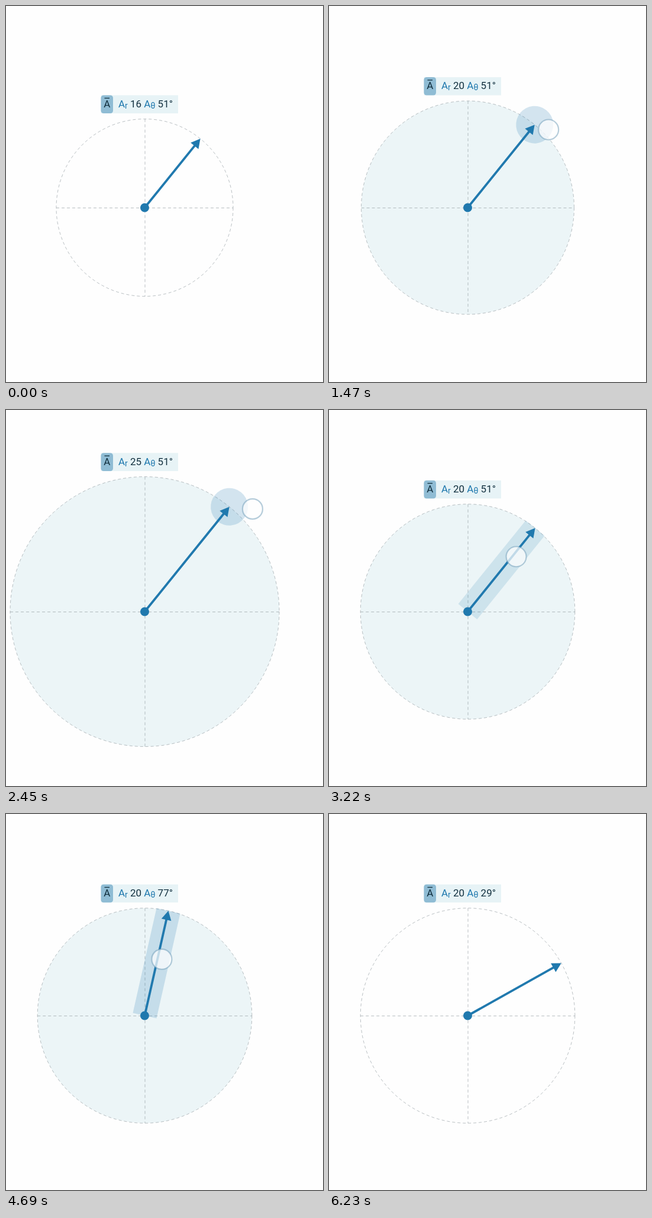
Recreate the animation shown at these times as an HTML page. Size 536 by 634 pixels, loop 6300 ms.

```html
<!DOCTYPE html>
<html lang="en">
<head>
<meta charset="utf-8">
<title>Polar vector</title>
<style>
  html, body { margin: 0; width: 100%; height: 100%; overflow: hidden; background: #fefefe; }
  svg { display: block; width: 536px; height: 634px; }
  text { font: 17px Roboto, sans-serif; fill: #12303f; text-anchor: middle; white-space: pre; }
  .var { fill: #2079ae; }
  .sub { fill: #2079ae; font-size: 14px; }
  .guide { fill: none; stroke: #8a9499; stroke-opacity: .6; stroke-dasharray: 5 4; }
  .glow { fill: #1f78b0; fill-opacity: .19; }
  .ink { fill: #2079ae; }
</style>
</head>
<body>
<svg viewBox="0 0 536 634">
  <rect id="edge" x="535" y="317" width="1" height="166" fill="#dcdcdc"/>
  <g transform="translate(234.5 340)">
    <circle id="disc" fill="#ecf5f7"/>
    <circle id="ring" class="guide"/>
    <path id="axes" class="guide"/>
    <g id="vector">
      <rect id="band" class="glow" x="0" y="-20.5" height="41"/>
      <circle id="halo" class="glow" r="31.5"/>
      <path id="shaft" fill="none" stroke="#2079ae" stroke-width="3.8"/>
      <path id="head" class="ink" d="M0 0L-15.5 -8.5V8.5Z"/>
    </g>
    <circle class="ink" r="7.5"/>
  </g>
  <g id="label">
    <rect x="160.5" width="130.5" height="30.5" fill="#e7f3f6"/>
    <rect x="160.5" width="20.5" height="30.5" rx="4.5" fill="#8fbcd4"/>
    <text x="170.8" y="20">A</text>
    <path d="M166.5 4.9h8.5" stroke="#12303f" stroke-width="1.3"/>
    <text x="236" y="20"><tspan class="var">A</tspan><tspan class="sub" dy="2">r</tspan><tspan id="radius" dy="-2"></tspan><tspan class="var">A</tspan><tspan class="sub" dy="2">θ</tspan><tspan id="angle" dy="-2"></tspan></text>
  </g>
  <circle id="cursor" r="17" fill="#fff" fill-opacity=".72" stroke="#6f9bb8" stroke-opacity=".5" stroke-width="2.2"/>
</svg>
<script>
const LOOP = 6300, STEP = 70, UNIT = 9.12, CX = 234.5, CY = 340;
const el = {};
document.querySelectorAll('[id]').forEach(n => el[n.id] = n);
const set = (name, attrs) => {
  for (const k in attrs) el[name].setAttribute(k, attrs[k]);
};

// Smooth monotone curve through [time, value] points
function track(keys) {
  const n = keys.length - 1;
  const slope = i => (keys[i + 1][1] - keys[i][1]) / (keys[i + 1][0] - keys[i][0]);
  const tangent = i => {
    if (i === 0 || i === n) return 0;
    const a = slope(i - 1), b = slope(i);
    return a * b <= 0 ? 0 : 2 * a * b / (a + b);
  };
  return t => {
    if (t <= keys[0][0]) return keys[0][1];
    if (t >= keys[n][0]) return keys[n][1];
    let i = 0;
    while (t > keys[i + 1][0]) i++;
    const [t0, v0] = keys[i], [t1, v1] = keys[i + 1];
    const h = t1 - t0, u = (t - t0) / h, w = 1 - u;
    return v0 * w * w * (1 + 2 * u) + v1 * u * u * (3 - 2 * u)
      + h * u * w * (tangent(i) * w - tangent(i + 1) * u);
  };
}
const fade = (in0, in1, out0, out1) => track([[in0, 0], [in1, 1], [out0, 1], [out1, 0]]);

const length = track([[980, 149.5], [1400, 169.5], [1820, 274.5], [1940, 284.5],
  [2100, 262], [2450, 227.5], [2800, 182.5], [2900, 181.3]]);
const theta = track([[3480, 51], [4060, 103.5], [4220, 111], [4900, 66],
  [5320, 63.7], [5740, 29.2]]);
// Pointer position relative to the arrow tip, in polar terms
const reach = track([[200, -60], [650, 8.5], [1400, 9.5], [1820, 12.3], [2450, 24],
  [2800, 28], [3400, -81], [4060, -80.5], [5320, -83.3]]);
const drift = track([[200, -25], [650, -7], [2450, -7.5], [2800, -11], [3400, 0],
  [4060, 0.5], [4900, -5], [5320, -5], [5740, -2]]);

const discFade = fade(140, 420, 5670, 6160);
const haloFade = fade(400, 600, 2900, 3080);
const bandFade = fade(3080, 3280, 5700, 5900);
const cursorFade = fade(140, 350, 5780, 6060);

function draw(t) {
  const r = length(t), a = theta(t);
  const d = r + reach(t), p = (a + drift(t)) * Math.PI / 180;
  set('disc', { r, opacity: discFade(t) });
  set('ring', { r });
  set('axes', { d: `M${-r} .5H${r}M.5 ${-r}V${r}` });
  set('vector', { transform: `rotate(${-a})` });
  set('band', { width: r, opacity: bandFade(t) });
  set('halo', { cx: r, opacity: haloFade(t) });
  set('shaft', { d: `M0 0H${r - 12}` });
  set('head', { transform: `translate(${r} 0)` });
  set('label', { transform: `translate(0 ${CY - r - 40})` });
  set('cursor', { cx: CX + d * Math.cos(p), cy: CY - d * Math.sin(p), opacity: cursorFade(t) });
  set('edge', { opacity: r > 264 ? 1 : 0 });
  el.radius.textContent = ` ${Math.round(r / UNIT)} `;
  el.angle.textContent = ` ${Math.round(a)}°`;
}

const start = performance.now();
function tick() {
  const t = (performance.now() - start) % LOOP;
  draw(t < 2 * STEP ? 0 : Math.floor(t / STEP) * STEP);
  requestAnimationFrame(tick);
}
tick();
</script>
</body>
</html>
```
